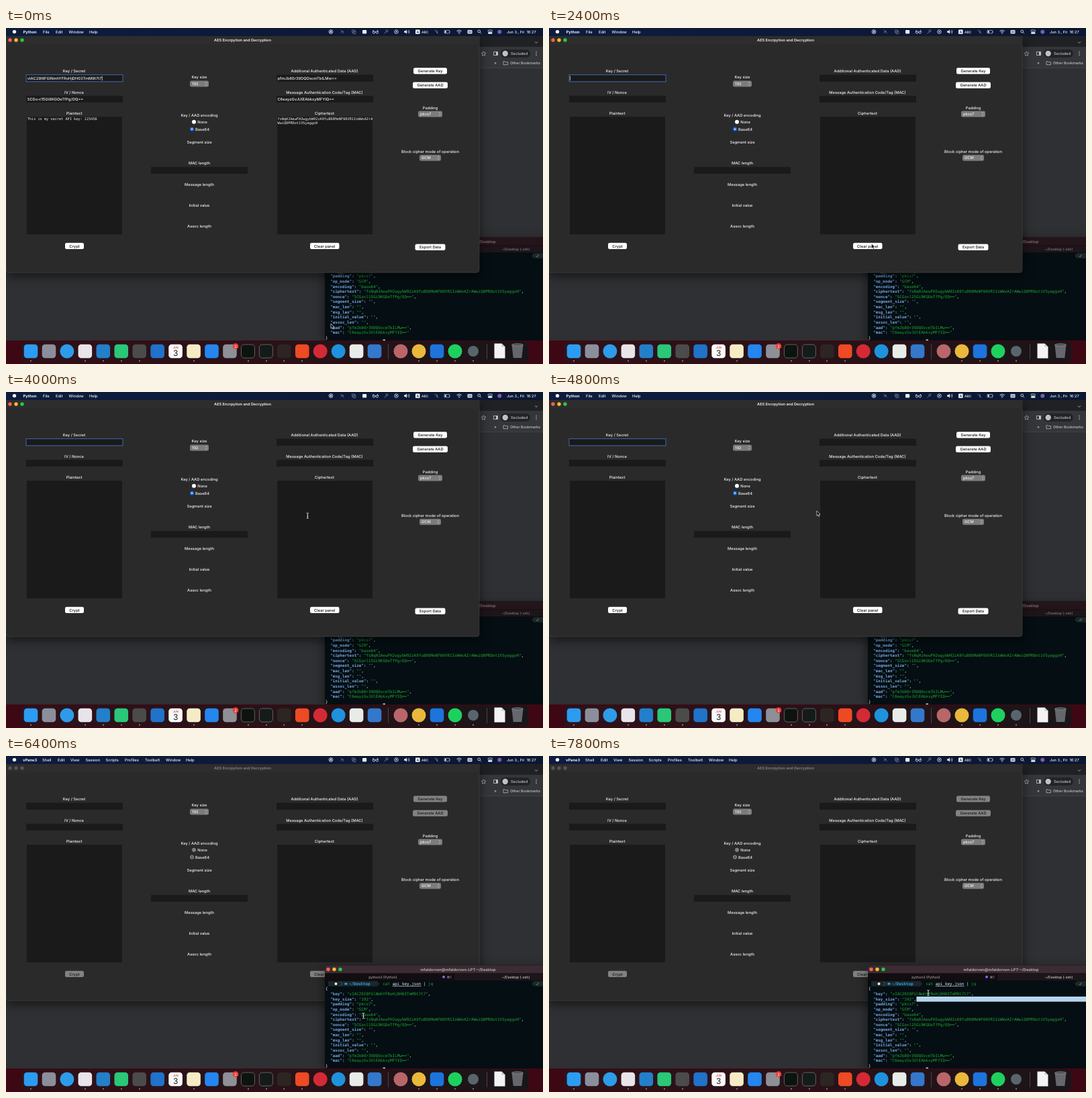
Recreate the animation shown at these times as an HTML page. Size 800x500 px, loop 8000 ms.

```html
<!DOCTYPE html>
<html lang="en">
<head>
<meta charset="utf-8">
<title>AES Encryption and Decryption</title>
<style>
  html, body { margin: 0; height: 100%; overflow: hidden; background: #000; }
  svg { display: block; width: 100vw; height: 100vh; }
  text { font-family: Inter, sans-serif; font-size: 5.75px; font-weight: 500; fill: #f4f4f4; white-space: pre; text-rendering: geometricPrecision; }
  .mono { font-family: "DejaVu Sans Mono", monospace; font-weight: 400; }
  .pane { filter: drop-shadow(0 5px 8px rgba(0, 0, 0, .55)); }
  .button { fill: #fff; }
  .buttonText { fill: #111; }
  .ring { stroke: #4267ad; }
  .dot { fill: #fff; }
  .bar { fill: #24151a; }
  .terminalFront .button { fill: #828282; }
  .terminalFront .buttonText { fill: #181818; }
  .terminalFront .ring { stroke: none; }
  .terminalFront #app .light { fill: #555; }
  .terminalFront #app .title { fill: #858585; }
  .terminalFront .radio { fill: #808080; }
  .terminalFront .dot { fill: #2a2a2a; }
  .terminalFront .bar { fill: #3a2c32; }
  #terminal .title { opacity: .55; }
  #terminal .light { fill: #5a4448; }
  .terminalFront #terminal .title { opacity: 1; }
  .terminalFront #terminal .l0 { fill: #ff5f57; }
  .terminalFront #terminal .l1 { fill: #febc2e; }
  .terminalFront #terminal .l2 { fill: #28c840; }
</style>
</head>
<body>
<svg id="stage" viewBox="0 0 800 500">
  <defs>
    <linearGradient id="menuFill"><stop stop-color="#0e1c3d"/><stop offset="1" stop-color="#0c1732"/></linearGradient>
    <linearGradient id="dockFill"><stop stop-color="#2f1119"/><stop offset=".6" stop-color="#251318"/><stop offset="1" stop-color="#191518"/></linearGradient>
  </defs>
  <g id="browser"></g>
  <g id="terminal"></g>
  <g id="app"></g>
  <g id="menu"></g>
  <g id="dock"></g>
  <g id="cursor">
    <path id="arrow" d="M0 0V7.2L1.7 5.7L2.8 8.2L4 7.7L2.9 5.2H5.1Z" fill="#050505" stroke="#e8e8e8" stroke-width=".7"/>
    <g id="beam" fill="none">
      <path d="M-1.6 -4Q0 -4 0 -3V3Q0 4 -1.6 4M1.6 -4Q0 -4 0 -3M1.6 4Q0 4 0 3M-.9 .8H.9" stroke="#111" stroke-width="1.8"/>
      <path d="M-1.6 -4Q0 -4 0 -3V3Q0 4 -1.6 4M1.6 -4Q0 -4 0 -3M1.6 4Q0 4 0 3M-.9 .8H.9" stroke="#eee" stroke-width=".9"/>
    </g>
  </g>
</svg>
<script>
const $ = id => document.getElementById(id);
const stage = $("stage");
const FRAME = 200, LOOP = 8000, CLEARED = 2200, FOCUS = 6200, SELECTED = 7600;

const rect = (x, y, w, h, fill, extra = "") =>
  `<rect x="${x}" y="${y}" width="${w}" height="${h}" fill="${fill}" ${extra}/>`;
const circle = (x, y, r, fill, extra = "") =>
  `<circle cx="${x}" cy="${y}" r="${r}" fill="${fill}" ${extra}/>`;
const line = (d, color = "#eee", width = .8) =>
  `<path d="${d}" fill="none" stroke="${color}" stroke-width="${width}"/>`;
// y is the vertical centre of the capitals
const text = (x, y, content, extra = "") => `<text x="${x}" y="${y + 2.1}" ${extra}>${content}</text>`;
const centred = (x, y, content, extra = "") => text(x, y, content, `text-anchor="middle" ${extra}`);
const lights = (x, y) => ["#ff5f57", "#febc2e", "#28c840"]
  .map((color, i) => circle(x + 9 * i, y, 2.7, color, `class="light l${i}"`)).join("");

const secret = {
  key: "vIAC29I8FGlNmhYFRoHjDH03TmM9t7t7",
  nonce: "SCGo+l15Gi9KGOeTfPg/OQ==",
  aad: "pfmJb80r39DQOxcmTbILMw==",
  mac: "C6eayzGvJUlEAbkxyMFYIQ==",
  cipher: ["fsNqHJAewFH2wgybW92zA9fu806MeNF60VR1IsWWxAZrA", "WwiQ0PRDot1VSyaggxH"]
};

function drawBrowser() {
  const grey = "#c6c7c9";
  return rect(0, 12, 800, 453, "#2f3033")
    + rect(0, 12, 800, 16, "#202124")
    + rect(0, 28, 800, 31, "#35363a")
    + rect(0, 59, 800, .6, "#4a4b4f")
    + line("M788 20.5l2 2l2 -2", grey)
    + line("M711.5 34.8l1 2.1l2.3 .3l-1.7 1.6l.4 2.3l-2 -1.1l-2 1.1l.4 -2.3l-1.7 -1.6l2.3 -.3Z", grey, .7)
    + line("M726.5 35.5h6v5h-6Z", grey) + rect(730, 35.5, 2.5, 5, grey)
    + rect(737, 32, 44, 12, "#222327", 'rx="6"')
    + circle(743.7, 38, 4.2, "#bfc1c4")
    + text(752, 38, "Secluded", `style="font-size:5.6px;fill:${grey}"`)
    + [35.5, 38, 40.5].map(y => circle(790, y, .7, grey)).join("")
    + centred(729, 52, "»", `style="fill:${grey}"`)
    + line("M741 49.8h2.4l.8 .9h3.3v4h-6.5Z", grey, .7)
    + text(751, 52, "Other Bookmarks", `style="font-size:5.4px;fill:${grey}"`);
}

function drawTerminal() {
  const left = 476, pitch = 7.63, top = 346.3;
  const size = 'class="mono" style="font-size:5.92px"';
  const tint = (color, s, bold) => `<tspan style="fill:${color}${bold ? ";font-weight:bold" : ""}">${s}</tspan>`;
  const fields = Object.entries({
    key: secret.key, key_size: "192", padding: "pkcs7", op_mode: "GCM", encoding: "base64",
    ciphertext: secret.cipher.join(""), nonce: secret.nonce, segment_size: "", mac_len: "", msg_len: "",
    initial_value: "", assoc_len: "", aad: secret.aad, mac: secret.mac
  });
  const rows = ["{", ...fields.map(([name, value], i) =>
    "  " + tint("#78a5dc", `"${name}"`, true) + ": " + tint("#20a82e", `"${value}"`)
    + (i < fields.length - 1 ? "," : "")), "}"];
  return rect(475, 311.5, 397, 153.5, "#050e13", 'class="pane" rx="4"')
    + rect(475, 311.5, 397, 12, "", 'class="bar" rx="4"')
    + rect(475, 320, 397, 3.5, "", 'class="bar"')
    + rect(475, 323.5, 192, 10.5, "#110d10") + rect(667.5, 323.5, 205, 10.5, "#1c1519")
    + rect(475, 323.2, 397, .5, "#150b0e") + rect(667, 323.5, .6, 10.5, "#050405")
    + lights(480, 317.5)
    + `<g class="title">`
    + centred(673.5, 317.5, "mfaldorven@mfaldorven-LPT:~/Desktop", 'style="fill:#c4b9bd;font-weight:600;font-size:5.7px"')
    + centred(561.5, 328.8, "python3 (Python)", 'style="fill:#a89da0;font-size:5.1px"')
    + circle(652, 328.8, 2, "#7a6cf0")
    + text(656.5, 328.8, "⌘1", 'style="fill:#a89da0;font-size:5px;font-family:Inter,\'DejaVu Sans\',sans-serif"')
    + centred(759.5, 328.8, "~/Desktop (-zsh)", 'style="fill:#d8d0d2;font-size:5.1px"') + "</g>"
    + `<path d="M480 335h73l3.5 3.9l-3.5 3.9h-73Z" fill="#1d262a"/>`
    + circle(491.5, 339, 2, "#f0f0f0")
    + line("M498 335.5l3 3.5l-3 3.5", "#69757a", .6)
    + rect(504.5, 337.6, 3.8, 3, "#27a4e0", 'rx=".5"')
    + text(510.5, 339, "~/Desktop", 'class="mono" style="font-size:5.92px;font-weight:bold;fill:#27a4e0"')
    + text(561.5, 339, `${tint("#20a82e", "cat")} <tspan text-decoration="underline">api_key.json</tspan> | ${tint("#20a82e", "jq")}`, size)
    + `<path d="M786.5 335h14v7.8h-14l-3.5 -3.9Z" fill="#1d262a"/>`
    + line("M789.8 339.2l1.4 1.6l2.3 -3.8", "#45b52a", .9)
    + rect(547.4, 358, 253, 7.6, "#b5d5ee", 'id="selection"')
    + rows.map((row, i) => text(left, top + i * pitch, row, size)).join("")
    + rect(561.5, 463.6, 3.5, 1.4, "#d8d8d8");
}

function drawApp() {
  const box = (x, y, w, h, extra = "") => rect(x, y, w, h, "#1a1a1a", extra);
  const button = (x, y, w, label) => rect(x, y, w, 9.2, "", 'class="button" rx="2.2"')
    + centred(x + w / 2, y + 4.6, label, 'class="buttonText"');
  const select = (x, y, w, label) => rect(x, y, w, 9, "#7c7c7c", 'rx="2.2"')
    + text(x + 3, y + 4.5, label)
    + line(`M${x + w - 5.2} ${y + 3.6}l1.4 -1.5l1.4 1.5M${x + w - 5.2} ${y + 5.4}l1.4 1.5l1.4 -1.5`, "#ddd", .6);
  const code = (x, y, s) => text(x, y, s, 'class="mono" style="font-size:5.24px"');
  const labels = [
    [101.5, 64, "Key / Secret"], [101.5, 95.5, "IV / Nonce"], [101.5, 126.7, "Plaintext"],
    [288, 73, "Key size"], [288, 129.5, "Key / AAD encoding"], [288, 170, "Segment size"],
    [288, 201.3, "MAC length"], [288, 232.5, "Message length"], [288, 263.8, "Initial value"], [288, 295, "Assoc length"],
    [474.5, 64, "Additional Authenticated Data (AAD)"], [474.5, 95.5, "Message Authentication Code/Tag (MAC)"],
    [474.5, 126.7, "Ciphertext"], [632, 118.5, "Padding"], [632, 184, "Block cipher mode of operation"]
  ];
  return `<path class="pane" d="M0 12H705V360Q705 364 701 364H4Q0 364 0 360Z" fill="#2a2a2a" stroke="#4c4c4c" stroke-width=".5"/>`
    + rect(0, 12, 705, 12.5, "#2e2d2d") + lights(6, 18)
    + centred(352.5, 18, "AES Encrpytion and Decryption", 'class="title" style="font-weight:600;font-size:5.6px"')
    + labels.map(([x, y, s]) => centred(x, y, s)).join("")
    + box(30, 69.6, 144, 10.2, 'class="ring" stroke-width="1"')
    + box(30, 100.8, 144, 10) + box(403, 69.6, 144, 10.2) + box(403, 100.8, 144, 10)
    + box(216, 206.8, 144, 10)
    + box(31, 132, 142, 175) + box(404, 132, 142, 175)
    + circle(280, 139.8, 3, "#fff", 'class="radio"') + text(285.3, 139.8, "None")
    + circle(277, 150.5, 3, "#1670e8", 'class="radio"') + circle(277, 150.5, 1.1, "", 'class="dot"') + text(282, 150.5, "Base64")
    + select(274, 78.5, 28, "192") + select(614, 123.5, 36, "pkcs7") + select(616, 188.8, 32, "GCM")
    + button(88, 319.8, 28, "Crypt") + button(453, 319.8, 43.5, "Clear panel")
    + button(607, 59.2, 50, "Generate Key") + button(606, 80.6, 52, "Generate AAD")
    + button(609.5, 321.6, 45, "Export Data")
    + `<g id="entries">` + text(31.7, 74.8, secret.key, 'id="keyText"') + text(31.7, 106, secret.nonce)
    + text(404.5, 74.8, secret.aad) + text(404.5, 106, secret.mac)
    + code(31.7, 135.2, "This is my secret API key: 123456")
    + secret.cipher.map((s, i) => code(404.5, 135.2 + 6.1 * i, s)).join("") + "</g>"
    + rect(0, 71.4, .7, 6.8, "#f4f4f4", 'id="caret"');
}

function drawMenu() {
  const items = (id, list) => `<g id="${id}">` + list.map(([x, s], i) =>
    text(x, 5.6, s, i ? "" : 'style="font-weight:700"')).join("") + "</g>";
  return rect(0, 0, 800, 12, "url(#menuFill)") + circle(12.5, 5.6, 2.7, "#f4f4f4")
    + items("appMenu", [[25.5, "Python"], [55, "File"], [74, "Edit"], [93.5, "Window"], [124, "Help"]])
    + items("terminalMenu", [[25, "vPane3"], [54, "Shell"], [77, "Edit"], [96, "View"], [118.5, "Session"],
      [148.5, "Scripts"], [177, "Profiles"], [207, "Toolbelt"], [238, "Window"], [268, "Help"]])
    + circle(484, 5.6, 2.8, "none", 'stroke="#eee" stroke-width=".9"') + rect(482.8, 4.4, 2.4, 2.4, "#eee")
    + line("M498.5 3.2l5 4.8M499 7.5l2 -3l2 1", "#7f8ca5")
    + line("M515.5 3h3.8v3.8h-3.8ZM517 4.6h4v4h-4Z", "#8994aa", .6)
    + rect(531, 3, 6.2, 5.5, "#eee", 'rx="1"')
    + circle(548, 6.4, 1.7, "none", 'stroke="#eee" stroke-width=".8"') + circle(552.8, 6.4, 1.7, "none", 'stroke="#eee" stroke-width=".8"')
    + line("M546.4 6l1 -3M554.4 6l-1 -3M549.7 6h1.5")
    + line("M563.5 8.5l3.5 -3.5", "#8994aa") + circle(567.5, 4.3, 1.5, "none", 'stroke="#8994aa" stroke-width=".8"')
    + circle(581.5, 5.6, 2.8, "none", 'stroke="#eee" stroke-width=".8"') + `<path d="M580.7 4.1v3l2.4 -1.5Z" fill="#eee"/>`
    + `<path d="M593 4.5h1.8l2.2 -2v6.2l-2.2 -2H593Z" fill="#eee"/>` + line("M598.5 4q1.2 1.6 0 3.2M600 2.8q2.2 2.8 0 5.6", "#eee", .7)
    + rect(610, 2.4, 6.6, 6.6, "#f4f4f4", 'rx="1"') + centred(613.3, 5.7, "A", 'style="fill:#15244a;font-size:5.4px"')
    + text(619, 5.6, "ABC", 'style="font-size:5px"')
    + line("M638.5 3l5.5 5.5M641 3q3 2 1 5", "#8994aa")
    + line("M653 3.5h7.6v4.4h-7.6ZM661.6 5v1.5", "#ddd", .6) + rect(653.8, 4.3, 2, 2.8, "#eee")
    + line("M671.5 4.6q3.6 -3 7.2 0M673 6.3q2.1 -1.7 4.2 0", "#eee", .9) + circle(675.1, 8, .8, "#eee")
    + rect(687.5, 3, 7, 5.4, "#e6e6e6", 'rx="1"') + rect(688.5, 4.5, 5, .7, "#26375e") + rect(688.5, 6.3, 5, .7, "#26375e")
    + circle(704.7, 5, 1.9, "none", 'stroke="#eee" stroke-width=".8"') + line("M706 6.4l2 2")
    + rect(718, 3, 6.5, 2.4, "none", 'rx="1.2" stroke="#eee" stroke-width=".7"') + rect(718, 6.3, 6.5, 2.4, "#eee", 'rx="1.2"')
    + circle(735.3, 5.7, 3, "#775fa8")
    + text(746, 5.6, "Jun 3., Fri  16:27", 'style="font-size:5.6px"');
}

function drawDock() {
  const colors = ["#2b9cf0", "#8b8f9b", "#2d9be8", "#e9e4ea", "#237fc9", "#29c777", "#4b4b4b", "#2073c9", "#fafafa",
    "#f5ecc5", "#2486ee", "#8d9096", "#0d1410", "#141b19", "#2d2522", "#ee4a24", "#d32a35", "#1e92dd", "#e8ece9", "#3478cb"];
  const round = new Set([2, 16, 17]);
  const icon = (x, color, isRound) => isRound ? circle(x, 481, 10.5, color) : rect(x - 10.3, 470.7, 20.6, 20.6, color, 'rx="4.6"');
  const outlined = x => rect(x - 10, 471, 20, 20, "none", 'rx="4.4" stroke="#808583" stroke-width=".7"');
  const running = [37, 118, 145, 172, 199, 280, 361, 388, 414, 441, 615, 642, 669, 696];
  return rect(0, 465, 800, 35, "#3d0813")
    + rect(22, 466.5, 756, 32, "url(#dockFill)", 'rx="7"')
    + colors.map((color, i) => icon(37 + 26.95 * i, color, round.has(i))).join("")
    + outlined(360.4) + outlined(387.4)
    + centred(252.6, 474.5, "JUN", 'style="font-size:4px;font-weight:600;fill:#e5443f"')
    + `<text x="252.6" y="488" text-anchor="middle" style="font-size:12px;font-weight:400;fill:#222">3</text>`
    + circle(342, 473.5, 4.3, "#f03e38") + centred(342, 473.5, "2", 'style="font-size:5.6px"')
    + rect(569, 470, .7, 23, "#6b5259") + rect(716, 470, .7, 23, "#6b5259")
    + icon(588, "#b9666a", true) + icon(615, "#e9b83c", true) + icon(642, "#1c74dc")
    + icon(669, "#1ed15f", true) + circle(696, 481, 8, "#59656d")
    + `<path d="M727.5 469.5h11l5 5v17h-16Z" fill="#f3f3f3"/><path d="M738.5 469.5v5h5Z" fill="#c9c9c9"/>`
    + `<path d="M753.5 471.5h17l-2.2 19.5h-12.6Z" fill="#74767c" opacity=".85"/>`
    + `<ellipse cx="762" cy="471.5" rx="8.5" ry="1.7" fill="#494b51" stroke="#a7a9ae" stroke-width=".6"/>`
    + running.map(x => circle(x, 495.4, .9, "#c0a7ae")).join("");
}

$("browser").innerHTML = drawBrowser();
$("terminal").innerHTML = drawTerminal();
$("app").innerHTML = drawApp();
$("menu").innerHTML = drawMenu();
$("dock").innerHTML = drawDock();

// Pointer stops: time, x, y
const path = [
  [0, 484, 440], [1400, 488, 351], [2200, 480.5, 321], [2400, 480.5, 321], [4000, 449.3, 184],
  [5600, 348.5, 170], [6200, 532.5, 386.5], [6400, 532.5, 386.5], [7800, 565, 352.5]
];

function pointerAt(t) {
  const next = path.findIndex(stop => stop[0] > t);
  if (next < 0) return path.at(-1).slice(1);
  const [t0, x0, y0] = path[next - 1], [t1, x1, y1] = path[next];
  const u = (t - t0) / (t1 - t0), eased = u * u * (3 - 2 * u);
  return [x0 + (x1 - x0) * eased, y0 + (y1 - y0) * eased];
}

const show = (id, visible) => $(id).style.display = visible ? "" : "none";
const caretAfterKey = 32 + $("keyText").getComputedTextLength();
let terminalFront = false;

function render(now) {
  const t = Math.floor(now % LOOP / FRAME) * FRAME;
  const cleared = t >= CLEARED, front = t >= FOCUS;
  if (front !== terminalFront) {
    terminalFront = front;
    stage.insertBefore($(front ? "terminal" : "app"), $("menu"));
  }
  stage.classList.toggle("terminalFront", front);
  show("appMenu", !front);
  show("terminalMenu", front);
  show("entries", !cleared);
  show("caret", !front && (t + 450) % 900 < 600);
  $("caret").setAttribute("x", cleared ? 31 : caretAfterKey);
  show("selection", t >= SELECTED);

  const [x, y] = pointerAt(t);
  const overText = y > 132 && y < 307 && (x > 404 && x < 546 || x > 31 && x < 173);
  const beam = front || overText;
  show("beam", beam);
  show("arrow", !beam);
  $("cursor").setAttribute("transform", `translate(${x} ${y})`);
}

function tick() {
  render(performance.now());
  requestAnimationFrame(tick);
}
tick();
</script>
</body>
</html>
```
